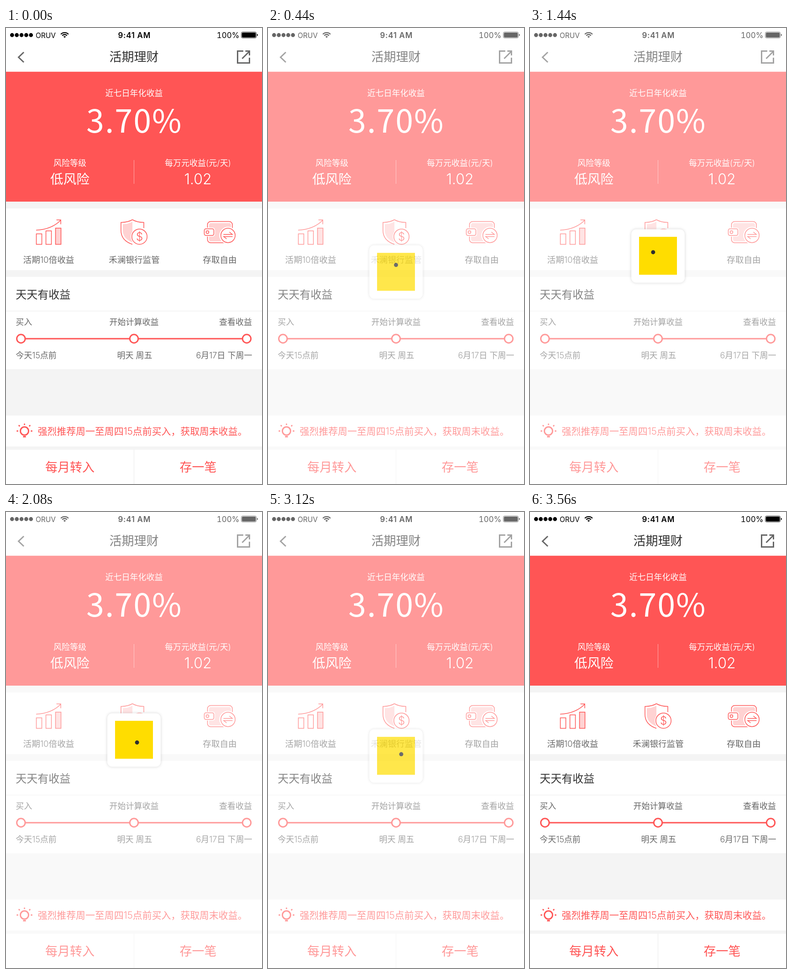
Recreate the animation shown at these times as an HTML page. Size 561x998 px, loop 4040 ms.

```html
<!DOCTYPE html>
<html lang="zh-CN">
<head>
<meta charset="utf-8">
<title>活期理财</title>
<style>
  html, body { margin: 0; width: 100%; height: 100%; overflow: hidden; background: #fff; }
  svg { display: block; width: 561px; height: 998px; }
  text { font: 300 18px Inter, "Noto Sans CJK SC", sans-serif; }
  .mid { text-anchor: middle; }
  .end { text-anchor: end; }
  .status { font-size: 17px; font-weight: 400; }
  .s21 { font-size: 20.9px; }
  .s24 { font-size: 24px; }
  .s27 { font-size: 27px; }
  .s29 { font-size: 28.7px; }
  .spaced { font-size: 18.6px; }
  .clock { font-size: 17px; font-weight: 600; letter-spacing: .7px; }
  .rate { font: 400 70px "Noto Sans CJK SC", sans-serif; letter-spacing: 2px; }
  .money { font-size: 32px; font-weight: 350; }
  .status, .gray { font-variant-numeric: tabular-nums; }
  .line { fill: none; stroke: #ff5555; stroke-width: 1.5; }
  .bold { fill: none; stroke: #ff5555; stroke-width: 3; }
  .nav { fill: none; stroke: #666; stroke-width: 3; }
  .white { fill: #fff; }
  .red { fill: #ff5555; }
  .pink { fill: #ffd2d2; }
  .gray { fill: #666; }
  .dark { fill: #333; }
  #tile { filter: drop-shadow(0 0 3px rgba(0, 0, 0, .16)); }
</style>
</head>
<body>
<svg viewBox="0 0 561 998">
  <rect width="561" height="998" fill="#f4f4f4"/>
  <path class="white" d="M0 0H561V96H0zM0 395H561V530H0zM0 544.7H561V746.7H0zM0 848.2H561V915.8H0zM0 923H561V998H0z"/>
  <rect class="red" y="95.7" width="561" height="284.3"/>
  <path d="M0 619.5H561M280.5 923V998" stroke="#ebebeb"/>

  <!-- status bar -->
  <path d="M13.3 15.5H55" stroke="#000" stroke-width="8.8" stroke-linecap="round" stroke-dasharray="0 10.35"/>
  <text class="status" x="65" y="21.5" style="font-size:15.5px">ORUV</text>
  <path d="M120.2 13.8A11.2 11.2 0 0 1 136.8 13.8M123.3 16.6A7 7 0 0 1 133.7 16.6" fill="none" stroke="#000" stroke-width="2.4"/>
  <path d="M125.8 18.9A3.6 3.6 0 0 1 131.2 18.9L128.5 21.6z"/>
  <text class="clock mid" x="281.3" y="21.5">9:41 AM</text>
  <text class="status end" x="511.5" y="21.5">100%</text>
  <rect x="515.6" y="8.6" width="33" height="13.4" rx="3" fill="none" stroke="#000" stroke-width=".8"/>
  <rect x="516.9" y="9.9" width="30.4" height="10.8" rx="2"/>
  <path d="M550 12.8Q552 13.4 552 15.2T550 17.7z"/>

  <!-- title bar -->
  <path class="nav" d="M39 53L27.5 64L39 75"/>
  <text class="dark s27 mid" x="280.5" y="73.3">活期理财</text>
  <path class="nav" d="M520 50.5H507.5V76.5H533.5V65M517.5 67L533 51.5M524.5 50.5H533.5V60"/>

  <!-- yield panel -->
  <g class="white">
    <text class="mid" x="280.5" y="148.5">近七日年化收益</text>
    <text class="rate mid" x="281.3" y="229.3">3.70%</text>
    <text class="mid" x="140" y="301.8">风险等级</text>
    <text class="s29 mid" x="140" y="340.5">低风险</text>
    <text class="mid" x="420.5" y="301.8">每万元收益(元/天)</text>
    <text class="money mid" x="420.5" y="341.5">1.02</text>
    <rect x="280" y="289" width="1" height="52" opacity=".5"/>
  </g>

  <!-- features -->
  <g class="line">
    <rect x="66.5" y="450.5" width="12" height="23"/>
    <rect x="87.5" y="444" width="12" height="29.5"/>
    <rect class="pink" x="108.5" y="438" width="12" height="35.5"/>
    <path d="M66 442.5C86 441.5 106 435 120 420.5M110.5 420H120V429.5"/>

    <path class="pink" stroke="none" d="M277 424Q268 429 256 429.5V443C256 455 264 464 277 469z"/>
    <path d="M277 419.5Q267 425.5 252 425.5V443C252 459 262 468.5 277 473.5M277 419.5Q287 425.5 302 425.5V438"/>
    <circle class="white" cx="292.5" cy="456.7" r="19" stroke="none"/>
    <circle cx="292.5" cy="456.7" r="16.7"/>

    <rect class="pink" x="445" y="427" width="48" height="40" rx="4" stroke="none"/>
    <rect x="441.5" y="423.5" width="54.5" height="46.5" rx="7"/>
    <rect class="white" x="432" y="437" width="26" height="19.5" rx="5" stroke="none"/>
    <rect x="434.5" y="439.5" width="21" height="14.5" rx="3.5"/>
    <circle cx="441.5" cy="446.7" r="3"/>
    <circle class="white" cx="486.5" cy="454" r="19" stroke="none"/>
    <circle cx="486.5" cy="454" r="15.7"/>
    <path d="M476.5 451.7H496L489.5 446.5M496.5 456.5H477L483.5 461.5"/>
  </g>
  <text class="red s24 mid" x="292.5" y="465.3">$</text>
  <g class="gray">
    <text class="spaced mid" x="93.5" y="514">活期10倍收益</text>
    <text class="spaced mid" x="281" y="514">禾澜银行监管</text>
    <text class="spaced mid" x="468.5" y="514">存取自由</text>
  </g>

  <!-- schedule -->
  <text class="dark s24" x="21.3" y="592">天天有收益</text>
  <g class="gray">
    <text x="21.3" y="650.3">买入</text>
    <text class="mid" x="280.5" y="650.3">开始计算收益</text>
    <text class="end" x="539" y="650.3">查看收益</text>
    <text x="21.3" y="722.8">今天15点前</text>
    <text class="mid" x="282" y="722.8">明天 周五</text>
    <text class="end" x="539.5" y="722.8">6月17日 下周一</text>
  </g>
  <g class="bold">
    <path d="M33 680H527.5"/>
    <circle class="white" cx="32.8" cy="680" r="9.2"/>
    <circle class="white" cx="280.5" cy="680" r="9.2"/>
    <circle class="white" cx="527.5" cy="680" r="9.2"/>

    <circle cx="40.5" cy="882" r="9"/>
    <path stroke-linecap="round" d="M38.5 894.5H42.5M24.5 882H25.5M55.5 882H56.5M40.5 867V867.5M28.7 870.2L29.3 870.8M52.3 870.2L51.7 870.8"/>
  </g>

  <!-- tip and buttons -->
  <g class="red">
    <text class="s21" x="69.5" y="890">强烈推荐周一至周四15点前买入，获取周末收益。</text>
    <text class="s27 mid" x="140" y="971">每月转入</text>
    <text class="s27 mid" x="421" y="971">存一笔</text>
  </g>

  <rect id="veil" class="white" width="561" height="998"/>
  <g id="loader">
    <rect id="tile" class="white" x="222" y="440.5" width="117" height="117" rx="11"/>
    <rect x="239" y="457" width="83" height="83" fill="#ffdd00"/>
    <circle id="dot" cx="280.5" cy="483.5" r="4.5" fill="#2e2e2e"/>
  </g>
</svg>
<script>
  const LOOP = 4040, STEP = 40, FADE = 400, SIZE = 117;
  const [veil, loader, dot] = ["veil", "loader", "dot"].map(id => document.getElementById(id));
  const ramp = (t, from, span) => Math.min(1, Math.max(0, (t - from) / span));
  // Rises from 0 to 1 at `start`, falls back from `end`.
  const pulse = (t, start, end) => ramp(t, start, FADE) - ramp(t, end, FADE);

  function draw(now) {
    const t = Math.floor(now % LOOP / STEP) * STEP;
    const shown = pulse(t, 160, 3000);
    veil.setAttribute("opacity", 0.4 * pulse(t, 0, 3160));
    loader.setAttribute("opacity", shown);
    loader.setAttribute("transform", `translate(0 ${SIZE * (1 - shown)})`);
    dot.setAttribute("transform", `rotate(${810 * ramp(t, 560, 2440)} 280.5 495)`);
  }

  const start = performance.now();
  function tick() {
    draw(performance.now() - start);
    requestAnimationFrame(tick);
  }
  tick();
</script>
</body>
</html>
```
